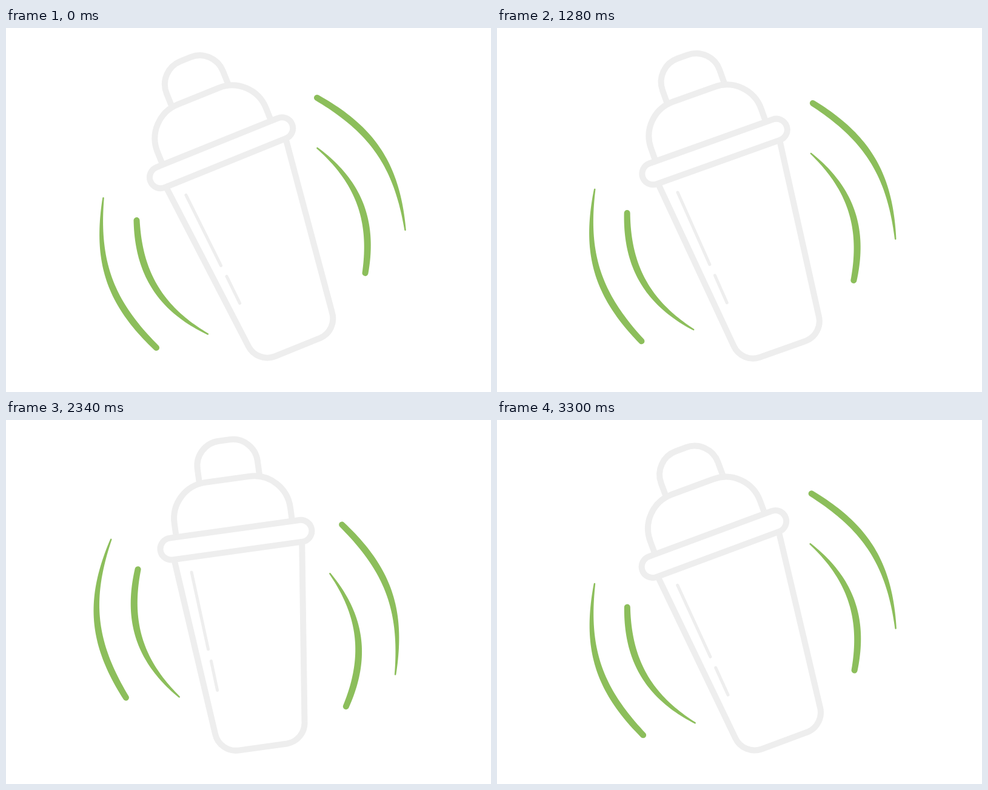
These frames come from a looping animation (800 by 600 pixels, 3.32 s). An HTML page:

```html
<!DOCTYPE html>
<html lang="en">
<head>
<meta charset="utf-8">
<title>Shaker</title>
<style>
  html, body { margin: 0; width: 100%; height: 100%; overflow: hidden; background: #fff; }
  svg { display: block; }
</style>
</head>
<body>
<svg width="800" height="600" viewBox="0 0 800 600">
  <g id="cup" fill="none" stroke="#eee" stroke-width="10">
    <path d="M-53.300 -205V-228.500A41 41 0 0 1 -12.300 -269.500H5.700A41 41 0 0 1 46.700 -228.500V-205"/>
    <path d="M-103.300 -122V-145A60 60 0 0 1 -43.300 -205H29.700A60 60 0 0 1 89.700 -145V-122"/>
    <rect x="-132.300" y="-122.200" width="252" height="36" rx="18"/>
    <path d="M-111.800 -86L-84.300 208A35 35 0 0 0 -50 240H31A35 35 0 0 0 64.500 208L101 -86"/>
    <path d="M-86.300 -61.500L-76.500 68M-74.400 88L-70.900 137" stroke-width="5" stroke-linecap="round"/>
  </g>
  <g id="left" fill="#8cbe5b"></g>
  <g id="right" fill="#8cbe5b"></g>
</svg>
<script>
const LOOP = 3320, STEP = 20, PERIOD = 668, OFFSET = 2;
const REST = -22, LOW = -22.1, SWING = 14.2;
const byId = id => document.getElementById(id);
const cup = byId('cup'), left = byId('left'), right = byId('right');

// Tapered curve from a thick round end to a thin tip.
// sag is the signed bulge, k the handle length along the chord.
function swoosh(group, ax, ay, bx, by, sag, k) {
  const dx = bx - ax, dy = by - ay, len = Math.hypot(dx, dy), n = 48;
  const ox = dy / len * sag / 0.75, oy = -dx / len * sag / 0.75;
  const xs = [ax, ax + dx * k + ox, bx - dx * k + ox, bx];
  const ys = [ay, ay + dy * k + oy, by - dy * k + oy, by];
  const at = (p, s) => {
    const u = 1 - s;
    return u * u * u * p[0] + 3 * u * u * s * p[1] + 3 * u * s * s * p[2] + s * s * s * p[3];
  };
  const slope = (p, s) => {
    const u = 1 - s;
    return u * u * (p[1] - p[0]) + 2 * u * s * (p[2] - p[1]) + s * s * (p[3] - p[2]);
  };
  const one = [], two = [];
  for (let i = 0; i <= n; i++) {
    const s = i / n, x = at(xs, s), y = at(ys, s);
    const tx = slope(xs, s), ty = slope(ys, s), m = Math.hypot(tx, ty);
    const h = (10 + 8.5 * s - 16 * s * s) / 2;
    one.push((x + ty / m * h).toFixed(2) + ' ' + (y - tx / m * h).toFixed(2));
    two.unshift((x - ty / m * h).toFixed(2) + ' ' + (y + tx / m * h).toFixed(2));
  }
  const path = document.createElementNS('http://www.w3.org/2000/svg', 'path');
  path.setAttribute('d', 'M' + one.join('L') + 'A1.25 1.25 0 0 1 ' + two.join('L') +
    'A5 5 0 0 1 ' + one[0] + 'Z');
  group.appendChild(path);
}

swoosh(right, 513, 115, 658.5, 333, 35.5, 0.365);
swoosh(right, 592.5, 404, 513.5, 198, -33, 0.344);
swoosh(left, 248, 527, 160.5, 280, 35.5, 0.365);
swoosh(left, 215.5, 317, 333, 504.5, -33, 0.344);

// Constant-speed swing back and forth.
function tilt(t) {
  const p = (((t - OFFSET) / PERIOD) % 1 + 1) % 1;
  return LOW + SWING * (1 - Math.abs(1 - 2 * p));
}

function draw(ms) {
  const a = tilt(Math.floor(ms % LOOP / STEP) * STEP);
  const turn = a - REST;
  cup.setAttribute('transform', `translate(400 300) rotate(${a})`);
  left.setAttribute('transform', `rotate(${turn} 503 290)`);
  right.setAttribute('transform', `rotate(${turn} 301 310)`);
}

let start;
function tick(now) {
  if (start === undefined) start = now;
  draw(now - start);
  requestAnimationFrame(tick);
}
draw(0);
requestAnimationFrame(tick);
</script>
</body>
</html>
```
